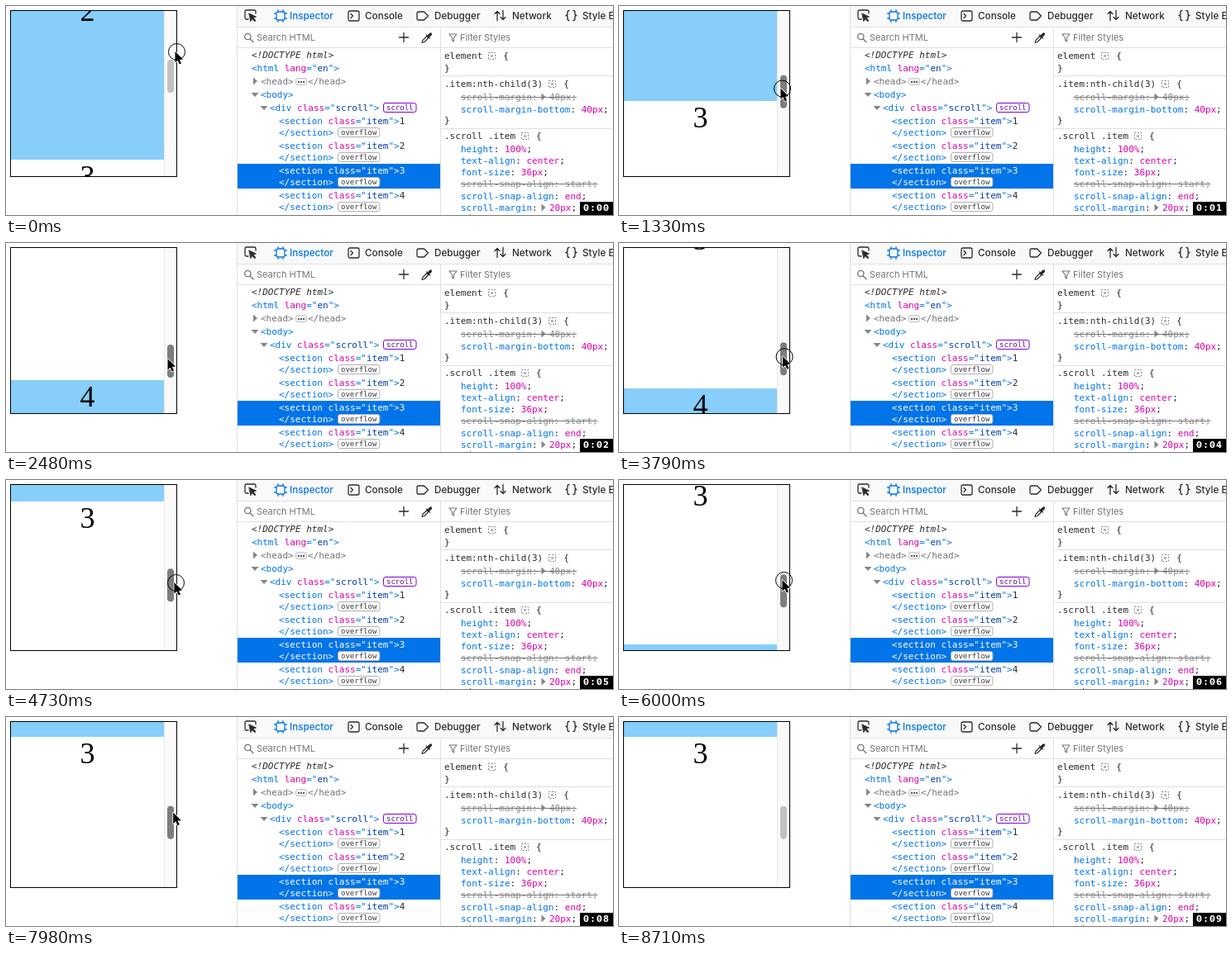
These frames come from a looping animation (734 by 253 pixels, 9.45 s). An HTML page with a canvas:

```html
<!DOCTYPE html>
<html lang="en">
<head>
<meta charset="utf-8">
<title>Scroll snap in the inspector</title>
<style>
html, body { margin: 0; width: 100%; height: 100%; overflow: hidden; background: #fff; }
canvas { display: block; }
</style>
</head>
<body>
<canvas id="stage" width="734" height="253"></canvas>
<script>
const ctx = document.getElementById('stage').getContext('2d');
const LOOP = 9450;
const MONO = '"DejaVu Sans Mono", monospace';
const SANS = 'Inter, sans-serif';
const CODE = '11px ' + MONO;
const CHAR = 6.62;
const BLUE = '#0074e8', PINK = '#dd00a9', NAVY = '#003eaa', INK = '#2a2a2e';
const GREY = '#737373', LINE = '#e0e0e2', DIM = '#8a8a8d', ARROW = '#85858c';

// time, hotspot x, hotspot y
const POINTER = [
  [0, 206.5, 55.5], [420, 206.5, 55.5], [800, 197.5, 81.5], [860, 197.5, 81.5],
  [1330, 197.5, 100], [2060, 197.5, 140.5], [3400, 197.5, 140.5], [3480, 198.5, 141.5],
  [3630, 198.5, 141.5], [4160, 205.5, 124.5], [5450, 205.5, 124.5], [5700, 199.5, 130.8],
  [5760, 199.5, 130.8], [6000, 199.5, 121.5], [6380, 199.5, 110.6], [6600, 199.5, 110.6],
  [6850, 202.5, 115.5], [7960, 202.5, 115.5], [8500, 600, 264]
];
// time, scroll offset
const SCROLL = [
  [0, 220], [860, 220], [1330, 291], [2060, 444], [2230, 444], [2480, 440],
  [3400, 440], [3480, 444], [3630, 444], [4160, 380], [4760, 380], [4940, 440],
  [5760, 440], [6000, 407], [6380, 363], [6600, 363], [6850, 382]
];
const PRESSED = [[0, 30], [800, 2230], [3250, 4760], [5720, 7170]];

// Monotone cubic through the keys of one column
function at(keys, t, col) {
  const last = keys.length - 1;
  if (t >= keys[last][0]) return keys[last][col];
  let i = 0;
  while (t >= keys[i + 1][0]) i++;
  const slope = j => j < 0 || j >= last ? 0
    : (keys[j + 1][col] - keys[j][col]) / (keys[j + 1][0] - keys[j][0]);
  const tangent = j => {
    const a = slope(j - 1), b = slope(j);
    return a * b <= 0 ? 0 : 2 * a * b / (a + b);
  };
  const h = keys[i + 1][0] - keys[i][0], u = (t - keys[i][0]) / h;
  const a = keys[i][col], b = keys[i + 1][col], v = 1 - u;
  return a * (1 + 2 * u) * v * v + tangent(i) * h * u * v * v
    + b * u * u * (3 - 2 * u) - tangent(i + 1) * h * u * u * v;
}

function rect(x, y, w, h, color) {
  ctx.fillStyle = color;
  ctx.fillRect(x, y, w, h);
}

function text(str, x, y, color, font = CODE, align = 'left') {
  ctx.font = font;
  ctx.textAlign = align;
  ctx.fillStyle = color;
  ctx.fillText(str, x, y);
}

// Coloured pieces of code, one after the other
function runs(x, y, parts) {
  for (const [str, color] of parts) {
    text(str, x, y, color);
    x += str.length * CHAR;
  }
}

function round(x, y, w, h, r, fill, stroke) {
  ctx.beginPath();
  ctx.roundRect(x, y, w, h, r);
  if (fill) { ctx.fillStyle = fill; ctx.fill(); }
  if (stroke) { ctx.strokeStyle = stroke; ctx.stroke(); }
}

function path(d, x, y, color, width = 1.3, fill) {
  const p = new Path2D(d);
  ctx.save();
  ctx.translate(x, y);
  if (fill) { ctx.fillStyle = fill; ctx.fill(p); }
  if (color) {
    ctx.strokeStyle = color;
    ctx.lineWidth = width;
    ctx.lineJoin = ctx.lineCap = 'round';
    ctx.stroke(p);
  }
  ctx.restore();
}

const down = (x, y) => path('M-4.5-2.5h9l-4.5 5z', x, y, null, 0, ARROW);
const right = (x, y) => path('M-2.5-4.5v9l5-4.5z', x, y, null, 0, ARROW);

function badge(label, x, y, border, color) {
  const w = label.length * 5.42 + 7;
  round(x + 0.5, y + 0.5, w, 11, 2.5, '#fff', border);
  text(label, x + 4, y + 9, color, '9px ' + MONO);
}

function page(scroll) {
  ctx.save();
  ctx.beginPath();
  ctx.rect(6, 6, 200, 200);
  ctx.clip();
  for (let i = 0; i < 4; i++) {
    const y = 6 + i * 200 - scroll;
    if (i % 2) rect(6, y, 185, 200, '#87cefa');
    text(String(i + 1), 98.5, y + 32, '#000', '36px "Liberation Serif", serif', 'center');
  }
  ctx.restore();
}

function scrollbar(scroll, active) {
  rect(191, 6, 15, 200, '#fafafa');
  rect(191, 6, 1, 200, '#e8e8e8');
  round(195, 7 + scroll * 0.2636, 8, 40, 4, active ? '#7d7d7d' : '#c1c1c1');
  ctx.strokeStyle = '#000';
  ctx.strokeRect(5.5, 5.5, 201, 201);
}

function toolbars() {
  rect(280, 0, 454, 25, '#f9f9fa');
  rect(280, 25, 454, 1, LINE);
  rect(280, 50, 454, 1, LINE);
  rect(279, 0, 1, 253, LINE);
  rect(525, 26, 1, 227, LINE);

  path('M5 12H3Q1 12 1 10V3Q1 1 3 1H12Q14 1 14 3V5', 288, 4, INK);
  path('M6 5L14.5 9L11 10.3L14 13.7L12.7 14.8L9.8 11.5L8 14.5Z', 288, 4, INK, 0.8, INK);

  path('M5 3H11Q13 3 13 5V11Q13 13 11 13H5Q3 13 3 11V5Q3 3 5 3Z'
    + 'M5 .7V3M11 .7V3M5 13V15.3M11 13V15.3M.7 5H3M.7 11H3M13 5H15.3M13 11H15.3', 324, 4, BLUE);
  path('M3 1H12Q14 1 14 3V11Q14 13 12 13H3Q1 13 1 11V3Q1 1 3 1ZM4 4.5L6.5 7L4 9.5', 413, 5, INK);
  path('M3 2H9.5L14.5 7L9.5 12H3Q1 12 1 10V4Q1 2 3 2Z', 496, 5, INK);
  path('M4 13V2M1 5L4 2L7 5M11 1V12M8 9L11 12L14 9', 590, 4.5, INK);
  path('M5 1Q3 1 3 3V5Q3 7 1 7Q3 7 3 9V11Q3 13 5 13M10 1Q12 1 12 3V5Q12 7 14 7Q12 7 12 9V11Q12 13 10 13',
    676, 4.5, INK);

  const tabs = [['Inspector', 343], ['Console', 434], ['Debugger', 518], ['Network', 612], ['Style Editor', 697]];
  tabs.forEach(([name, x], i) => text(name, x, 16, i ? INK : BLUE, '500 11.7px ' + SANS));

  path('M8 4.5A3.7 3.7 0 1 1 .6 4.5A3.7 3.7 0 1 1 8 4.5M7 7.2L11 11.2', 288, 32.5, GREY);
  text('Search HTML', 303, 42, GREY, '11px ' + SANS);
  path('M0-5.5V5.5M-5.5 0H5.5', 481, 38, INK);
  path('M1 13L2 10L7.5 4.5L9.5 6.5L4 12ZM6.3 3.3L10.7 7.7', 502, 31.5, INK, 1.1);
  path('M8.5 5.5L11.5 2.5', 502, 31.5, INK, 3.4);
  path('M.5 .5H9.5L6 5V9.5L4 8V5Z', 535.5, 33.5, GREY, 1.1);
  text('Filter Styles', 549, 42, GREY, '11px ' + SANS);
}

function section(n) {
  const y = 113 + n * 30, chosen = n === 3;
  if (chosen) rect(280, y - 12, 245, 30, BLUE);
  const pick = color => chosen ? '#fff' : color;
  runs(330, y, [['<section ', pick(BLUE)], ['class', pick(PINK)], ['="', pick(BLUE)],
    ['item', pick(NAVY)], ['">', pick(BLUE)], [String(n), pick(INK)]]);
  text('</section>', 330, y + 14, pick(BLUE));
  badge('overflow', 401, y + 4, '#b1b1b3', '#38383d');
}

function markup() {
  text('<!DOCTYPE html>', 297, 63, INK, 'italic ' + CODE);
  runs(297, 79, [['<html ', BLUE], ['lang', PINK], ['="', BLUE], ['en', NAVY], ['">', BLUE]]);
  right(301.5, 91);
  text('<head>', 308, 95, GREY);
  round(350.5, 87.5, 13, 8, 2, '#f0f0f2', '#c4c4c8');
  for (let i = 0; i < 3; i++) rect(353 + i * 3, 91, 2, 2, '#5f5f66');
  text('</head>', 365, 95, GREY);
  down(301, 107.5);
  text('<body>', 308, 111, BLUE);
  down(312, 123.5);
  runs(319, 127, [['<div ', BLUE], ['class', PINK], ['="', BLUE], ['scroll', NAVY], ['">', BLUE]]);
  badge('scroll', 456, 117, '#8000d7', '#5a0a9c');
  for (let n = 1; n <= 4; n++) section(n);
}

function selector(name, y) {
  text(name, 530, y, INK);
  const end = 530 + name.length * CHAR;
  ctx.strokeStyle = ARROW;
  ctx.setLineDash([2, 1.5]);
  ctx.strokeRect(Math.round(end + 7) + 0.5, y - 7.5, 8, 8);
  ctx.setLineDash([]);
  rect(Math.round(end + 10), y - 5, 3, 3, '#b5b5ba');
  text('{', end + 25, y, INK);
}

function rule(name, value, y, { struck, expands } = {}) {
  runs(550, y, [[name, struck ? DIM : BLUE], [':', struck ? DIM : INK]]);
  let x = 550 + (name.length + 2) * CHAR;
  if (expands) {
    right(650, y - 4);
    x = 657;
  }
  runs(x, y, [[value, struck ? DIM : PINK], [';', struck ? DIM : INK]]);
  if (struck) rect(550, y - 4, x + (value.length + 1) * CHAR - 550, 1, '#77777a');
}

function checkbox(y) {
  round(535, y, 12, 12, 2, '#0060df');
  path('M2.8 6.2L5 8.5L9.3 3.7', 535, y, '#fff', 1.6);
}

function rules(boxes) {
  selector('element', 64);
  text('}', 530, 79, INK);
  rect(526, 84, 208, 1, LINE);
  selector('.item:nth-child(3)', 98);
  rule('scroll-margin', '40px', 114, { struck: true, expands: true });
  rule('scroll-margin-bottom', '40px', 129);
  text('}', 530, 142, INK);
  rect(526, 148, 208, 1, LINE);
  selector('.scroll .item', 161);
  rule('height', '100%', 177);
  rule('text-align', 'center', 191);
  rule('font-size', '36px', 205);
  rule('scroll-snap-align', 'start', 219, { struck: true });
  rule('scroll-snap-align', 'end', 234);
  rule('scroll-margin', '20px', 248, { expands: true });
  rect(561, 252, 1, 1, BLUE);
  if (boxes) for (let i = 0; i < 6; i++) checkbox(Math.round(167 + i * 14.2));
}

function clock(t) {
  const label = '0:0' + Math.floor((t + 79) / 953);
  rect(694, 237, 40, 16, '#000');
  [...label].forEach((c, i) => {
    const x = 701.5 + i * 8;
    text(c, x, 248, '#fff', 'bold 10px "DejaVu Sans", sans-serif', 'center');
    if (c === '0') rect(x - 0.5, 244, 1, 1, '#fff');
  });
}

function pointer(x, y, pressed) {
  path('M0 0V13.5L3 10.7L5.2 15.6L7.5 14.6L5.3 9.9L9.5 9.6Z', x - 2, y - 0.5, '#fff', 1.6, '#000');
  path('M0 0V13.5L3 10.7L5.2 15.6L7.5 14.6L5.3 9.9L9.5 9.6Z', x - 2, y - 0.5, null, 0, '#000');
  if (!pressed) return;
  ctx.beginPath();
  ctx.arc(x, y, 10, 0, Math.PI * 2);
  ctx.strokeStyle = '#000';
  ctx.stroke();
}

function draw(t) {
  const x = at(POINTER, t, 1), y = at(POINTER, t, 2);
  const scroll = Math.round(at(SCROLL, t, 1));
  const pressed = PRESSED.some(([from, to]) => t >= from && t < to);
  ctx.lineWidth = 1;
  rect(0, 0, 734, 253, '#fff');
  page(scroll);
  scrollbar(scroll, t > 650 && x < 207);
  toolbars();
  markup();
  rules(x > 526 && t < 8710);
  if (t < 8500) pointer(x, y, pressed);
  clock(t);
}

const start = performance.now();
function tick() {
  draw((performance.now() - start) % LOOP);
  requestAnimationFrame(tick);
}
tick();
</script>
</body>
</html>
```
